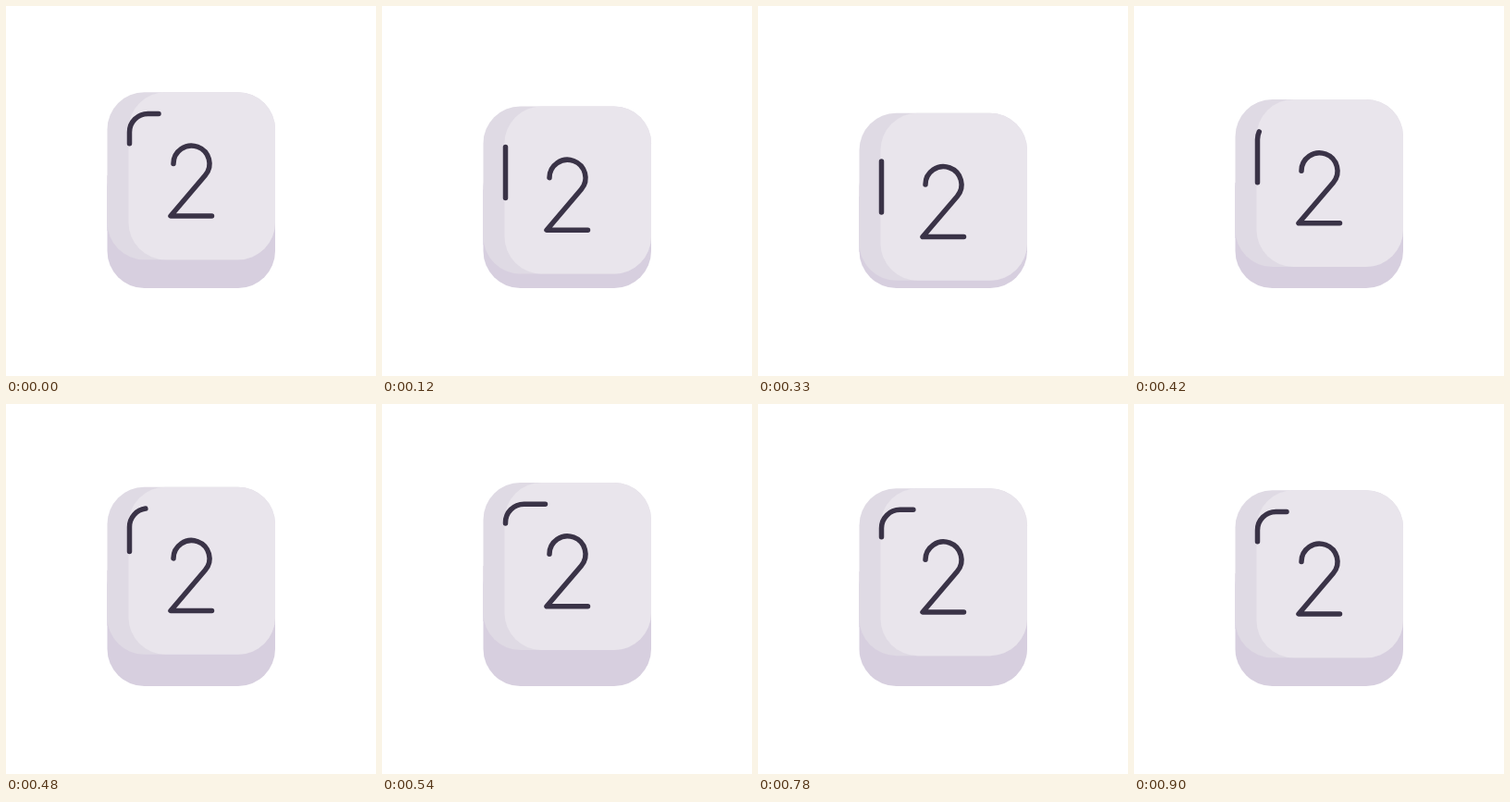
Recreate the animation shown at these times as an HTML page. Size 400 px wide and 400 px high, loop 2.93 s.

```html
<!DOCTYPE html>
<html lang="en">
<head>
<meta charset="utf-8">
<title>Key press</title>
<style>
html, body { margin: 0; height: 100%; overflow: hidden; background: #fff; }
svg { display: block; width: 100vw; height: 100vh; }
.line { fill: none; stroke: #3a3347; stroke-width: 5.5; stroke-linecap: round; stroke-linejoin: round; }
</style>
</head>
<body>
<svg viewBox="0 0 400 400">
  <rect x="109.5" y="155" width="181.5" height="150" rx="40" fill="#d7cfdf"/>
  <g id="cap">
    <!-- skirt that joins the cap to the base -->
    <rect x="109.5" y="90" width="181.5" height="60" fill="#d7cfdf"/>
    <rect x="109.5" width="181.5" height="181" rx="40" fill="#dfdae4"/>
    <rect x="132.5" width="158.5" height="181" rx="40" fill="#e9e5ec"/>
    <path class="line" d="M181 77.2A19.5 19.5 0 1 1 215.4 89.9L178 133.8H222.5"/>
    <path class="line" id="shine" d="M133.5 120V43.2A20 20 0 0 1 153.5 23.2H200" stroke-dasharray="55 400"/>
  </g>
</svg>
<script>
const LOOP = 2930, STEP = 30;
const cap = document.getElementById('cap');
const shine = document.getElementById('shine');

const mix = (a, b, p) => a + (b - a) * p;
const easeOut = n => p => 1 - (1 - p) ** n;
const easeIn = n => p => p ** n;
const easeBoth = p => (1 - Math.cos(Math.PI * p)) / 2;

// [start, end, from, to, easing]
const capY = [
  [0, 300, 93.2, 117, easeOut(2)],
  [300, 540, 117, 85, easeBoth],
  [540, 900, 85, 93.2, easeBoth]
];
// lower end of the highlight, measured from the top of the cap
const shineY = [
  [0, 300, 55.5, 109, easeOut(3.3)],
  [300, 540, 109, 44, easeIn(1.75)],
  [540, 900, 44, 55.5, easeBoth]
];

function at(track, t) {
  const [start, end, from, to, ease] = track.find(k => t < k[1]) || track[track.length - 1];
  return mix(from, to, ease(Math.min(1, (t - start) / (end - start))));
}

function draw(now) {
  const t = Math.floor(now % LOOP / STEP) * STEP;
  cap.setAttribute('transform', `translate(0 ${at(capY, t)})`);
  shine.setAttribute('stroke-dashoffset', at(shineY, t) - 120);
  requestAnimationFrame(draw);
}
draw(performance.now());
</script>
</body>
</html>
```
